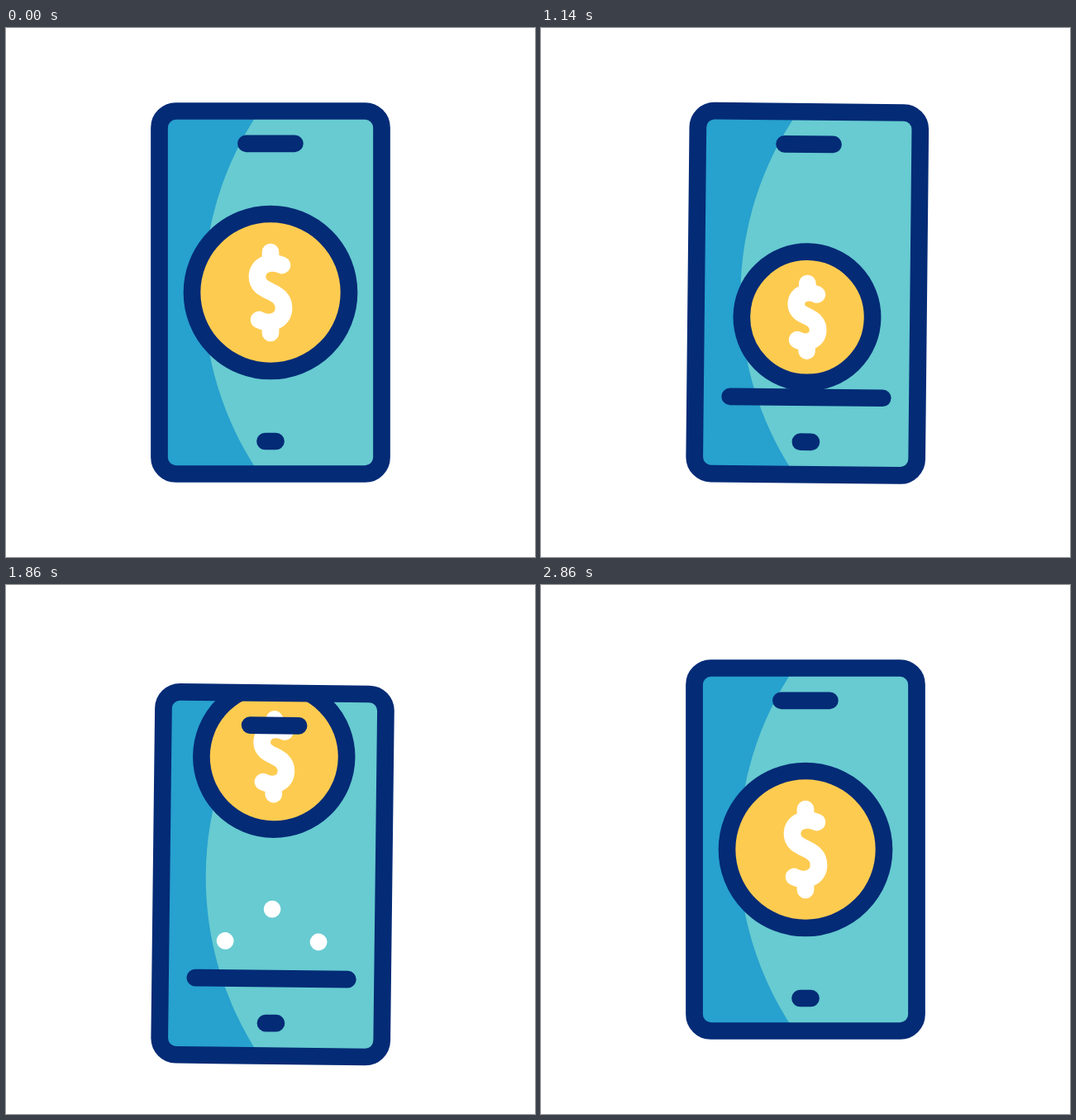
Animation, 640 px wide and 640 px high, one loop 3000 ms. Source, as an HTML page:

```html
<!DOCTYPE html>
<html lang="en">
<head>
<meta charset="utf-8">
<title>Phone and coin</title>
<style>
  html, body { margin: 0; width: 100%; height: 100%; overflow: hidden; background: #fff; }
  svg { display: block; width: 100%; height: 100%; }
  .navy { stroke: #042b76; }
  .white { stroke: #fff; }
  .stroke { fill: none; stroke-width: 20.7; stroke-linecap: round; stroke-linejoin: round; }
</style>
</head>
<body>
<svg viewBox="0 0 640 640">
  <defs>
    <clipPath id="screen"><rect x="185.5" y="100.5" width="269" height="439" rx="20"/></clipPath>
  </defs>
  <g id="phone">
    <g clip-path="url(#screen)">
      <rect x="185" y="100" width="270" height="440" fill="#67cbd1"/>
      <path d="M185 100H307A390.6 390.6 0 0 0 307 540H185Z" fill="#27a1ce"/>
      <path id="sparks" class="stroke white"/>
      <path id="bar" class="stroke navy"/>
      <g id="coin" stroke-linecap="round" stroke-linejoin="round">
        <circle r="95" fill="#fdcb50" class="navy"/>
        <path class="white" fill="none" d="M14 -33C0 -39 -16 -34 -16 -19C-16 2 16 -5 16 19C16 34 0 40 -14 33M0 -49V-40M0 49V40"/>
      </g>
    </g>
    <path class="stroke navy" d="M290.4 139.8H349.4M313.5 500H326.5"/>
    <rect class="stroke navy" x="185.5" y="100.5" width="269" height="439" rx="20"/>
  </g>
</svg>
<script>
const LOOP = 3000;
const STROKE = 20.7;

// Main beats in ms
const RAISED = 540, DROP = 735, HIT = 1125, LOW = 1515;
const SWAY = 225;
const SWAY_HEIGHTS = [51.8, 18.6, 39, 9.2, 9.5, 0];

const [phone, coin, bar, sparks] =
  ['phone', 'coin', 'bar', 'sparks'].map(id => document.getElementById(id));

const mix = (a, b, k) => a + (b - a) * k;

// Cubic Bezier (.42, 0, .58, 1), solved by bisection
function ease(x) {
  let low = 0, high = 1;
  for (let i = 0; i < 24; i++) {
    const s = (low + high) / 2, r = 1 - s;
    if (1.26 * s * r * r + 1.74 * s * s * r + s ** 3 < x) low = s;
    else high = s;
  }
  return low * low * (3 - 2 * low);
}

// Eased progress from 0 to 1 between two times
function ramp(t, from, to) {
  if (t <= from) return 0;
  return t >= to ? 1 : ease((t - from) / (to - from));
}

// Alternating tilt that dies away in pairs
function swayAngle(n) {
  return (-1) ** n * 9 * (1 - Math.ceil(n / 2) / 3) ** 1.35;
}

function phonePose(t) {
  const up = ramp(t, 0, RAISED), down = ramp(t, DROP, LOW);
  let angle = mix(-9.1 * up, swayAngle(0), down);
  let y = mix(-58 * up, SWAY_HEIGHTS[0], down);
  for (let n = 1; n < SWAY_HEIGHTS.length; n++) {
    const end = LOW + n * SWAY;
    const k = ramp(t, end - SWAY, end);
    angle = mix(angle, swayAngle(n), k);
    y = mix(y, SWAY_HEIGHTS[n], k);
  }
  return { x: -0.02 * angle ** 2, y, angle };
}

function drawCoin(t) {
  const y = 320 - 61 * ramp(t, 0, RAISED) + 91 * ramp(t, DROP, HIT)
    - 301 * ramp(t, HIT, LOW) + 271 * ramp(t, LOW, 2228);
  const scale = 1 - 0.167 * (ramp(t, 0, RAISED) - ramp(t, LOW, 2170));
  coin.setAttribute('transform', `translate(320 ${y}) scale(${scale})`);
  coin.setAttribute('stroke-width', STROKE / scale);
}

function drawBar(t) {
  const half = 92.3 * (ramp(t, 0, 610) - ramp(t, 1965, 2550));
  bar.setAttribute('d', half > 0.01 ? `M${320 - half} 446H${320 + half}` : '');
}

function drawSparks(t) {
  const head = ramp(t, HIT, 1600), tail = ramp(t, 1300, 1880);
  const visible = head > 0 && tail < 1;
  const point = (side, k) =>
    `${320 + side * mix(32, 56.5, k)} ${mix(390, 362, k) + Math.abs(side) * mix(24, 39, k)}`;
  const lines = [-1, 0, 1].map(side => `M${point(side, tail)}L${point(side, head)}`);
  sparks.setAttribute('d', visible ? lines.join('') : '');
}

function render(t) {
  const { x, y, angle } = phonePose(t);
  phone.setAttribute('transform', `translate(${x} ${y}) rotate(${angle} 320 540)`);
  drawCoin(t);
  drawBar(t);
  drawSparks(t);
}

const start = performance.now();
function tick() {
  render((performance.now() - start) % LOOP);
  requestAnimationFrame(tick);
}
tick();
</script>
</body>
</html>
```
